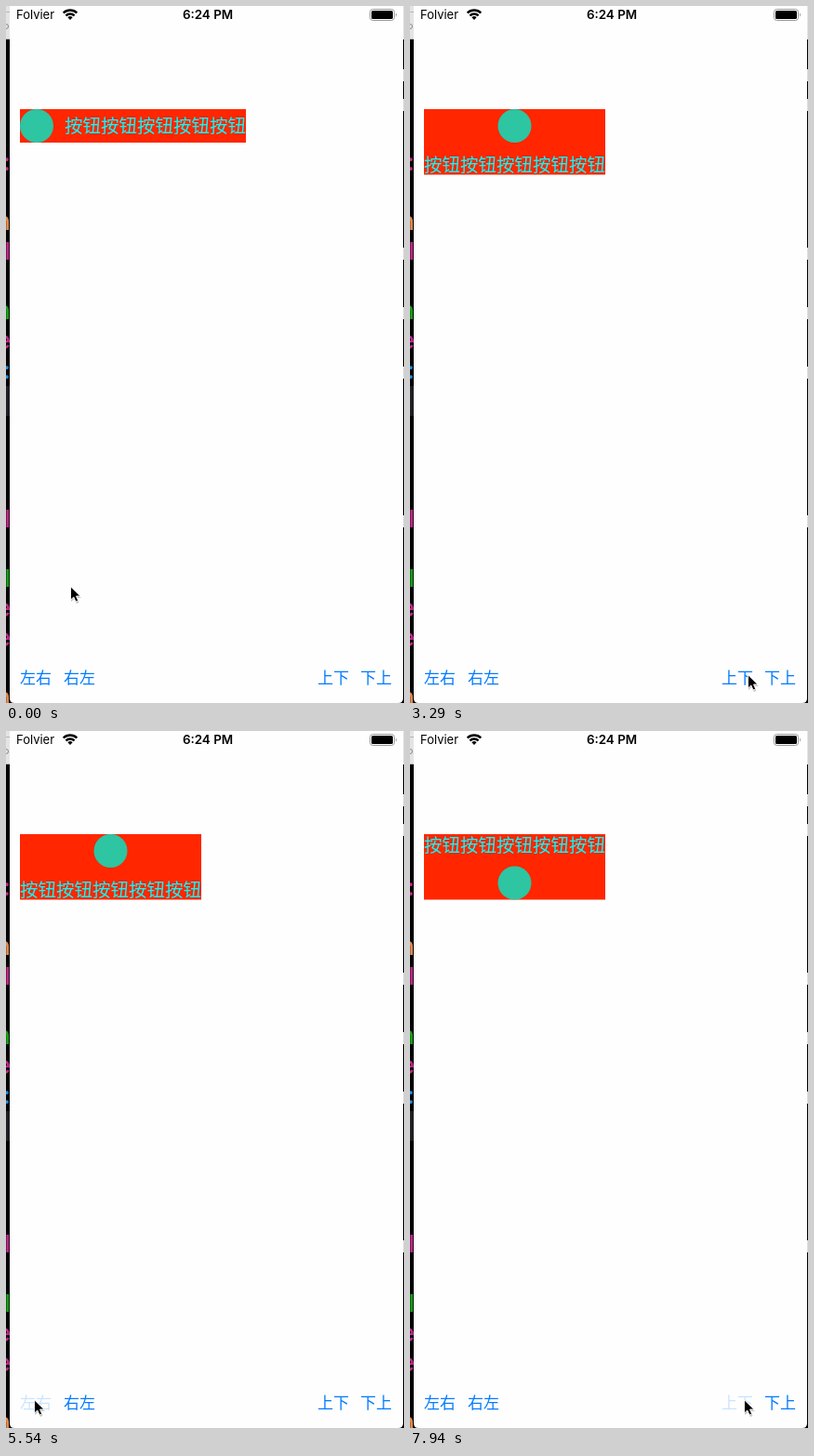
Recreate the animation shown at these times as an HTML page. Size 428 px wide and 750 px high, loop 8 s.

```html
<!DOCTYPE html>
<html lang="zh">
<head>
<meta charset="utf-8">
<style>
  html, body { margin: 0; height: 100%; overflow: hidden; background: #000; }
  svg { display: block; }
  .status { font: 13px Inter, sans-serif; }
  .cjk { font-family: "Noto Sans CJK SC", "Noto Sans CJK", sans-serif; font-weight: 300; }
  #code { font: 500 26px Inter, sans-serif; text-anchor: end; }
  #bar { font-size: 17px; fill: #007aff; }
  #label { font-size: 19.5px; fill: #00fdff; }
</style>
</head>
<body>
<svg width="428" height="750" viewBox="0 0 428 750">
  <!-- editor window behind the phone -->
  <rect width="428" height="750"/>
  <rect width="428" height="36" fill="#e4e4e6"/>
  <path d="M0 6.5h4M0 35.5h4" stroke="#b5b5b8"/>
  <circle cx="0" cy="22" r="2.5" fill="none" stroke="#888"/>
  <rect y="409" width="4" height="32" fill="#1d1f22"/>
  <g id="code"></g>

  <!-- phone screen -->
  <path d="M4 0H427V745q0 5-5 5H9q-5 0-5-5z" fill="#fefefe"/>
  <g class="status">
    <text x="11" y="14">Folvier</text>
    <text x="217" y="14" text-anchor="middle" font-weight="600" font-size="13.4">6:24 PM</text>
  </g>
  <g fill="none" stroke="#000" stroke-width="2.3">
    <path d="M61.7 7.5a10.4 10.4 0 0 1 14.6 0M64.4 10.4a6.5 6.5 0 0 1 9.2 0"/>
    <path d="M66.4 12.3a3.7 3.7 0 0 1 5.2 0L69 15z" fill="#000" stroke="none"/>
  </g>
  <rect x="391.5" y="3.5" width="26" height="12" rx="3" fill="none" stroke="#999"/>
  <rect x="393" y="5" width="23" height="9" rx="1.6"/>
  <path d="M419 7.5q2 2 0 4z" fill="#999"/>

  <rect id="box" fill="#ff2600"/>
  <text id="label" class="cjk">按钮按钮按钮按钮按钮</text>
  <circle id="icon" r="18" fill="#2dc5a2"/>

  <g id="bar" class="cjk">
    <text x="15" y="728.8">左右</text>
    <text x="62" y="728.8">右左</text>
    <text x="335" y="728.8">上下</text>
    <text x="381" y="728.8">下上</text>
  </g>
  <g id="cursor">
    <path d="M1 2.5v14.5l3.5-3 2.3 5 2.7-1-2.2-5h4.7z" opacity=".22"/>
    <path d="M.5.8v14.2l3.3-3 2.2 5 2.7-1.1-2.2-4.9h4.4z" stroke="#fff" stroke-width=".9"/>
  </g>
</svg>
<script>
const $ = id => document.getElementById(id);
const set = (id, attrs) => {
  for (const name in attrs) $(id).setAttribute(name, attrs[name]);
};
const clamp = v => Math.max(0, Math.min(1, v));
const mix = (a, b, p) => a + (b - a) * p;
const smooth = p => p * p * (3 - 2 * p);
const easeOut = p => 1 - (1 - p) ** 3;

// Line ends of the editor's text, one character per 32 px row
const inks = { ':': '#c2268b', n: '#e08a4b', e: '#c2268b', l: '#c2268b' };
$('code').innerHTML = [...': nl ne:    l lee n'].map((c, row) => {
  const ink = row === 5 || row === 14 ? '#14a014' : row === 7 ? '#1b8fe0' : inks[c];
  return `<text x="5" y="${177 + row * 32}" fill="${ink}">${c}</text>`;
}).join('') + [...'xx    x x x    x'].map((c, row) =>
  c === 'x' ? `<rect x="427" y="${68 + row * 32}" width="1" height="13" fill="#ddd"/>` : ''
).join('');

const LOOP = 8000, STEP = 150, PRESS = 100, FADE = 250;
const LEFT = 15, TOP = 111, ICON = 36, GAP = 12, LABEL = 195, LINE = 22.5;

// Bar button 0..3: icon left, right, above or below the label
function layout(mode) {
  const row = mode < 2, iconLast = mode % 2;
  const along = (iconSize, textSize) => iconLast
    ? [textSize + GAP + iconSize / 2, textSize / 2]
    : [iconSize / 2, iconSize + GAP + textSize / 2];
  const [ix, tx] = row ? along(ICON, LABEL) : [LABEL / 2, LABEL / 2];
  const [iy, ty] = row ? [ICON / 2, ICON / 2] : along(ICON, LINE);
  return {
    w: row ? ICON + GAP + LABEL : LABEL,
    h: row ? ICON : ICON + GAP + LINE,
    ix, iy, tx, ty
  };
}

// Press time, bar button, pointer x
const clicks = [
  [880, 0, 26], [1700, 1, 69], [2830, 2, 363], [3880, 3, 395], [4620, 2, 346],
  [5540, 0, 30], [6017, 1, 90], [6875, 2, 352], [7190, 3, 381], [7900, 2, 359]
];

function sampleTime(time) {
  const snap = origin => origin + Math.floor((time - origin) / STEP) * STEP;
  return time < 1340 ? Math.max(0, Math.min(750, snap(450))) : snap(1340);
}

function stateAt(t) {
  let from = layout(0), to = from, p = 1, x = 69, y = 624, free = 0;
  const alpha = [1, 1, 1, 1];
  for (const [press, button, px] of clicks) {
    // Longer trips take longer; the pointer rests briefly before pressing
    const arrive = press - 150, release = press + PRESS;
    const start = Math.max(free, arrive - 250 - 1.7 * Math.hypot(px - x, 719 - y));
    const trip = easeOut(clamp((t - start) / (arrive - start)));
    x = mix(x, px, trip);
    y = mix(y, 719, trip);
    if (t < press) break;

    const done = clamp((t - release) / FADE);
    alpha[button] = mix(0.2, 1, done);
    if (t >= release) [from, to, p] = [to, layout(button), smooth(done)];
    free = release + 60;
  }
  const box = {};
  for (const key in to) box[key] = mix(from[key], to[key], p);
  return { box, alpha, x, y };
}

function draw(now) {
  const { box, alpha, x, y } = stateAt(sampleTime(now % LOOP));
  set('box', { x: LEFT, y: TOP, width: box.w, height: box.h });
  set('label', { x: LEFT + box.tx - LABEL / 2, y: TOP + box.ty + 7.3 });
  set('icon', { cx: LEFT + box.ix, cy: TOP + box.iy });
  set('cursor', { transform: `translate(${x} ${y})` });
  [...$('bar').children].forEach((el, i) => el.setAttribute('opacity', alpha[i]));
  requestAnimationFrame(draw);
}
draw(0);
</script>
</body>
</html>
```
